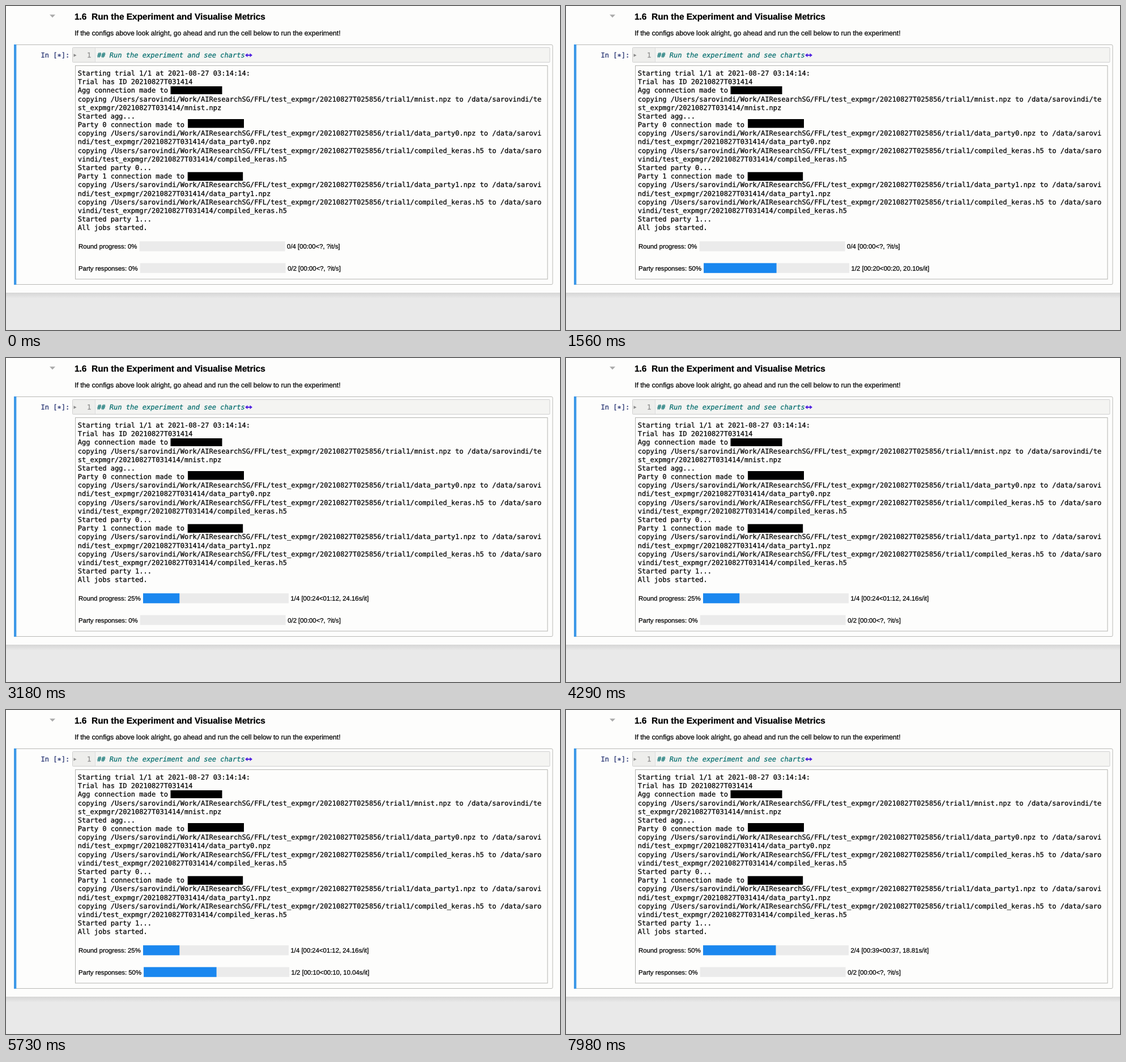
These frames come from a looping animation (978 by 573 pixels, 8000 ms). An HTML page:

```html
<!DOCTYPE html>
<html lang="en">
<head>
<meta charset="utf-8">
<title>Notebook run</title>
<style>
html, body { margin: 0; width: 100%; height: 100%; overflow: hidden; background: #fdfdfc; }
svg { display: block; width: 100%; height: 100%; }
text { white-space: pre; text-rendering: geometricPrecision; fill: currentColor; stroke: currentColor; stroke-width: .25px; }
svg { color: #000; }
.sans { font-family: "Liberation Sans", Arial, sans-serif; font-size: 11.35px; }
.mono { font-family: "DejaVu Sans Mono", monospace; font-size: 12.04px; }
</style>
</head>
<body>
<svg id="stage" viewBox="0 0 978 573" preserveAspectRatio="none">
  <defs>
    <linearGradient id="shadow" x2="0" y2="1">
      <stop offset="0" stop-color="#d6d6d6"/>
      <stop offset="1" stop-color="#e9e9e9"/>
    </linearGradient>
  </defs>
  <rect width="978" height="573" fill="#fdfdfc"/>
  <rect y="507" width="978" height="66" fill="#e9e9e9"/>
  <rect y="507" width="978" height="10" fill="url(#shadow)"/>

  <path d="M77 15.3h10l-5 5.2z" fill="#aaa"/>
  <text class="sans" x="121" y="23.5" style="font-size:15.45px;font-weight:bold">1.6  Run the Experiment and Visualise Metrics</text>
  <text class="sans" x="121" y="51.7" style="font-size:12.2px">If the configs above look alright, go ahead and run the cell below to run the experiment!</text>

  <rect x="14.5" y="68.5" width="950.5" height="424" rx="2" fill="none" stroke="#b9b9b5"/>
  <rect x="14" y="68" width="4.3" height="425" fill="#3c98e8"/>
  <rect x="117.5" y="73.5" width="842.5" height="26" rx="1" fill="#f4f4f2" stroke="#cfcfcf"/>
  <path d="M118 74h39.5v25h-39.5z" fill="#eeeeec"/>
  <path d="M157.5 74v25" stroke="#ddd"/>
  <path d="M119.5 84.5l5 2.7-5 2.7z" fill="#888"/>
  <text class="mono" x="61.5" y="90.8" color="#283573">In [∗]:</text>
  <text class="mono" x="143" y="90.8" color="#888">1</text>
  <text class="mono" x="161" y="90.8" color="#006c6c" font-style="italic">## Run the experiment and see charts</text>
  <path d="M422 87l4.5-3.6v2.7h4v-2.7l4.5 3.6-4.5 3.6v-2.7h-4v2.7z" fill="#4d1fe0"/>

  <rect x="122.5" y="105.5" width="833.5" height="377.5" fill="#fdfdfc" stroke="#b4b4b0"/>
  <g id="log"></g>
  <path d="M290.5 142h91v14h-91zM321 200h99v15.5h-99zM320.7 293.7h97.5v15.3h-97.5z"/>
</svg>
<script>
const stage = document.getElementById("stage");
const LOOP = 8000, BAR_WIDTH = 257;

function add(parent, tag, attrs, content = "") {
  const node = document.createElementNS("http://www.w3.org/2000/svg", tag);
  for (const key in attrs) node.setAttribute(key, attrs[key]);
  node.textContent = content;
  parent.append(node);
  return node;
}

const from = "copying /Users/sarovindi/Work/AIResearchSG/FFL/test_expmgr/20210827T025856/trial1/";
const run = "test_expmgr/20210827T031414/";
const partyLog = n => [
  `Party ${n} connection made to`,
  `${from}data_party${n}.npz to /data/sarovi`,
  `ndi/${run}data_party${n}.npz`,
  `${from}compiled_keras.h5 to /data/saro`,
  `vindi/${run}compiled_keras.h5`,
  `Started party ${n}...`
];
[
  "Starting trial 1/1 at 2021-08-27 03:14:14:",
  "Trial has ID 20210827T031414",
  "Agg connection made to",
  `${from}mnist.npz to /data/sarovindi/te`,
  "st_expmgr/20210827T031414/mnist.npz",
  "Started agg...",
  ...partyLog(0),
  ...partyLog(1),
  "All jobs started."
].forEach((line, i) =>
  add(document.getElementById("log"), "text", { class: "mono", x: 126.7, y: 123 + i * 15.18 }, line));

function progressBar(name, total, barX, top) {
  const y = top + 13;
  const label = add(stage, "text", { class: "sans", x: 128, y });
  const track = add(stage, "rect", { y: top, width: BAR_WIDTH, height: 17.5, fill: "#ebebeb" });
  const fill = add(stage, "rect", { y: top, height: 17.5, fill: "#1a87ef" });
  const status = add(stage, "text", { class: "sans", y });
  return (done, timing) => {
    const x = barX + (done ? 6.4 : 0);
    label.textContent = `${name}: ${100 * done / total}%`;
    track.setAttribute("x", x);
    fill.setAttribute("x", x);
    fill.setAttribute("width", BAR_WIDTH * done / total);
    status.setAttribute("x", x + 260.5);
    status.textContent = `${done}/${total} [${timing}]`;
  };
}
const showRound = progressBar("Round progress", 4, 235.6, 416.2);
const showParty = progressBar("Party responses", 2, 236.7, 454.7);

const idle = [0, "00:00<?, ?it/s"];
const round1 = [1, "00:24<01:12, 24.16s/it"];
const round2 = [2, "00:39<00:37, 18.81s/it"];
const states = [
  { at: 0, round: idle, party: idle },
  { at: 1260, round: idle, party: [1, "00:20<00:20, 20.10s/it"] },
  { at: 2280, round: round1, party: idle },
  { at: 4800, round: round1, party: [1, "00:10<00:10, 10.04s/it"] },
  { at: 6060, round: round2, party: idle }
];

const start = performance.now();
let shown;
function draw(now) {
  const time = Math.max(0, now - start) % LOOP;
  const state = states.findLast(s => s.at <= time);
  if (state !== shown) {
    showRound(...state.round);
    showParty(...state.party);
    shown = state;
  }
  requestAnimationFrame(draw);
}
draw(start);
</script>
</body>
</html>
```
